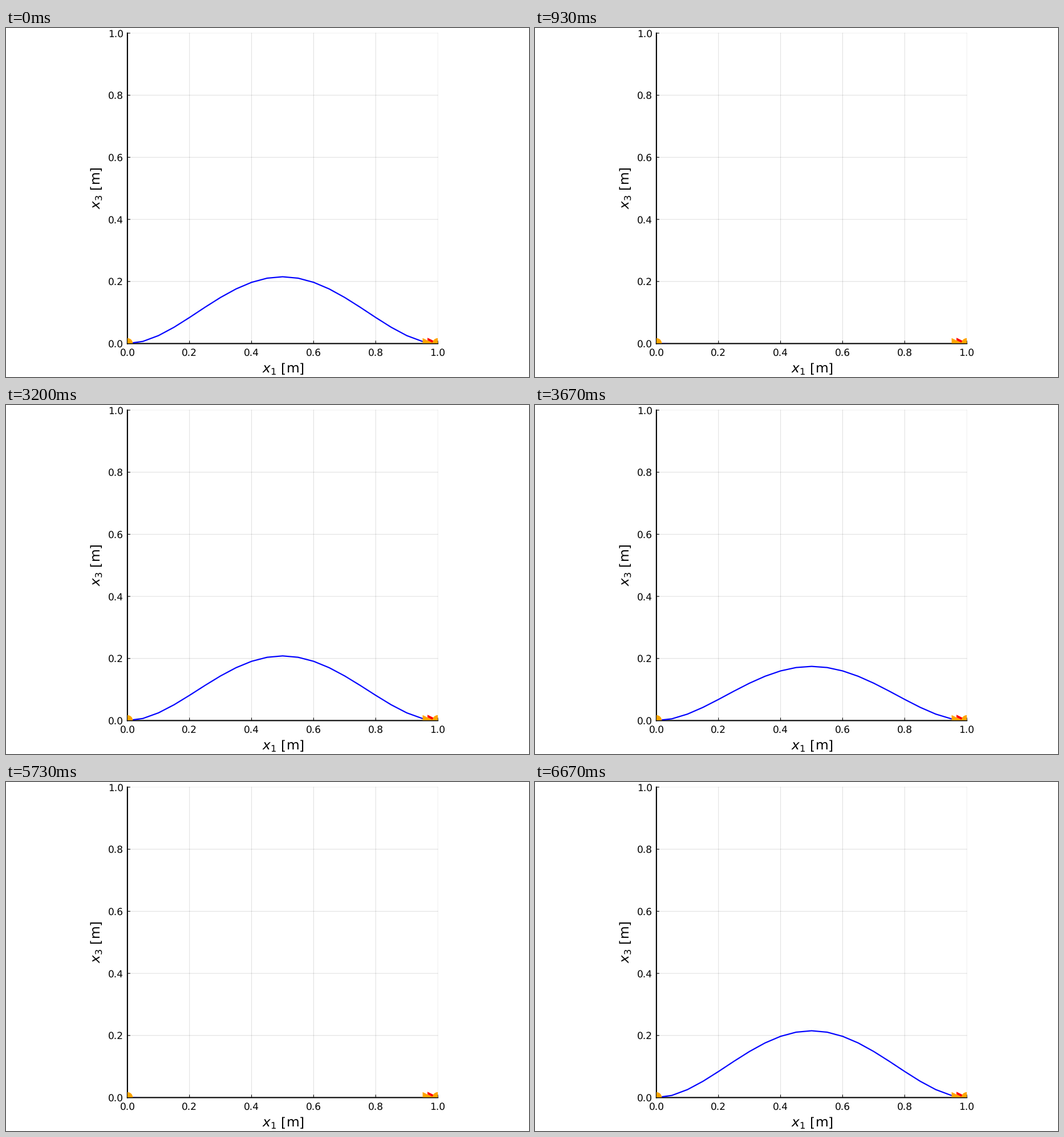
Animation, 917 px wide and 611 px high, one loop 6.71 s. Source, as a matplotlib script:

```python
import numpy as np
import matplotlib.pyplot as plt
from matplotlib.animation import FuncAnimation
from matplotlib.patches import Circle, Polygon, Rectangle

W, H, DPI = 917, 611, 64
PT = 72 / DPI                      # points per pixel
LEFT, RIGHT, TOP, BOTTOM = 212.9, 757.1, 9, 552.45
TICK_SIZE, LABEL_SIZE = 17, 23.35

TICK_MS, LOOP_MS = 10, 6710
LAST_STEP = 200                    # the beam is sampled 30 times a second
PERIOD = 100.05                    # in samples
AMPLITUDE = 0.2152

plt.rcParams["font.family"] = "DejaVu Sans"
plt.rcParams["mathtext.fontset"] = "dejavusans"
plt.rcParams["text.hinting"] = "none"

fig = plt.figure(figsize=(W / DPI, H / DPI), dpi=DPI, facecolor="white")
ax = fig.add_axes([0, 0, 1, 1])
ax.set(xlim=(0, W), ylim=(H, 0))
ax.axis("off")


def px(x):
    return LEFT + x * (RIGHT - LEFT)


def py(y):
    return BOTTOM - y * (BOTTOM - TOP)


def line(xs, ys, width, color="black", **style):
    return ax.plot(xs, ys, color=color, lw=width * PT, snap=False, **style)[0]


def label(x, y, text, size, ha="center", **style):
    ax.text(x, y, text, fontsize=size * PT, ha=ha, va="baseline", **style)


def clipped(patch):
    ax.add_patch(patch)
    patch.set_clip_path(window)


window = Rectangle((LEFT, TOP), RIGHT - LEFT, BOTTOM - TOP,
                   transform=ax.transData)

# Grid, axes and tick labels
for value in np.linspace(0, 1, 6):
    x, y = px(value), py(value)
    alpha = 0.06 if value == 1 else 0.12
    if value > 0:
        line([x, x], [TOP, BOTTOM], 1.1, alpha=alpha, zorder=1)
        line([LEFT, RIGHT], [y, y], 1.1, alpha=alpha, zorder=1)
    line([x, x], [BOTTOM, BOTTOM - 5], 1.1, zorder=2, solid_capstyle="butt")
    line([LEFT, LEFT + 5], [y, y], 1.1, zorder=2, solid_capstyle="butt")
    label(x, 573.7, f"{value:.1f}", TICK_SIZE)
    label(206, y + 6.4, f"{value:.1f}", TICK_SIZE, ha="right")
line([LEFT, LEFT], [TOP, BOTTOM], 2.1, zorder=2)
line([LEFT, RIGHT], [BOTTOM, BOTTOM], 2.1, zorder=2)
label(485.5, 604.3, "$x_1$ [m]", LABEL_SIZE)
label(165.6, 280.3, "$x_3$ [m]", LABEL_SIZE, rotation=90,
      rotation_mode="anchor")

# Supports
clipped(Polygon([(730.5, 542.8), (739, 547), (749, 551), (749, 554),
                 (730.5, 554)], fc="orange", lw=0, zorder=4))
clipped(Polygon([(739, 542.3), (749.5, 547.5), (749.5, 551.7), (739, 546.8)],
                fc="red", lw=0, zorder=5))
for end in (0, 1):
    clipped(Circle((px(end), py(0)), 9.5, fc="orange", lw=0, zorder=6))

# First bending mode of a beam clamped at both ends
nodes = np.linspace(0, 1, 21)
z = 4.73004 * nodes
mode = np.cosh(z) - np.cos(z) - 0.982502 * (np.sinh(z) - np.sin(z))
mode /= mode.max()
beam = line(px(nodes), py(0 * nodes), 2.2, "blue", zorder=3,
            solid_joinstyle="round")
beam.set_clip_path(window)


def update(tick):
    step = min(LAST_STEP, (6 * tick + 3) // 20)
    height = AMPLITUDE * np.cos(2 * np.pi * step / PERIOD)
    beam.set_ydata(py(height * mode))
    return (beam,)


anim = FuncAnimation(fig, update, frames=LOOP_MS // TICK_MS,
                     interval=TICK_MS, repeat=True, repeat_delay=0)
plt.show()
```
